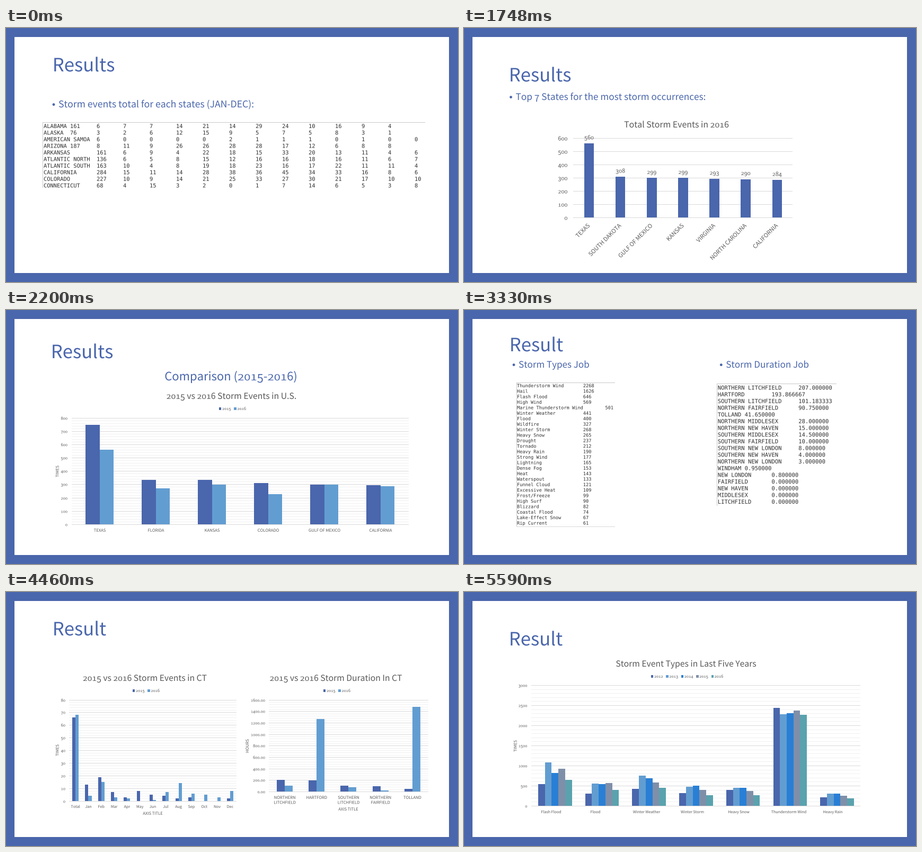
Write a matplotlib script that moves like this. It is 853 px wide and 480 px high and loops after 6.72 s.

```python
import numpy as np
import matplotlib.pyplot as plt
from matplotlib.animation import FuncAnimation
from matplotlib.patches import Circle, PathPatch, Rectangle
from matplotlib.path import Path
from matplotlib.textpath import TextPath
from matplotlib.transforms import Affine2D

W, H, DPI = 853, 480, 64
TICK = 10
LOOP = 6720
FIRST, STAY = 1070, 1130

BLUE, SKY, AZURE, SLATE, TEAL = "#4a66ac", "#629dd1", "#297fd5", "#7f8fa9", "#5aa2ae"
PAIR = BLUE, SKY
GREY, INK, MAJOR, MINOR, EDGE = "#595959", "#303030", "#d9d9d9", "#f0f0f0", "#c8c8c8"
SANS, MONO = "Noto Sans CJK JP", "DejaVu Sans Mono"
MONO_EM = 0.602

# Storm events in 2016, by state and by type
TOTALS = {"ALABAMA": 161, "ALASKA": 76, "AMERICAN SAMOA": 6, "ARIZONA": 187,
          "ARKANSAS": 161, "ATLANTIC NORTH": 136, "ATLANTIC SOUTH": 163,
          "CALIFORNIA": 284, "COLORADO": 227, "CONNECTICUT": 68}
TOP = {"TEXAS": 560, "SOUTH DAKOTA": 308, "GULF OF MEXICO": 299, "KANSAS": 299,
       "VIRGINIA": 293, "NORTH CAROLINA": 290, "CALIFORNIA": 284}
CT_MONTHS = (4, 15, 3, 2, 0, 1, 7, 14, 6, 5, 3, 8)
KNOWN = {"Thunderstorm Wind": 2268, "Hail": 1626, "Flash Flood": 646, "Winter Weather": 441,
         "Flood": 400, "Winter Storm": 268, "Heavy Snow": 265, "Heavy Rain": 190,
         "Waterspout": 133, "Rip Current": 61}
TYPES = """Thunderstorm Wind,Hail,Flash Flood,High Wind,Marine Thunderstorm Wind,
Winter Weather,Flood,Wildfire,Winter Storm,Heavy Snow,Drought,Tornado,Heavy Rain,
Strong Wind,Lightning,Dense Fog,Heat,Waterspout,Funnel Cloud,Excessive Heat,Frost/Freeze,
High Surf,Blizzard,Coastal Flood,Lake-Effect Snow,Rip Current""".replace("\n", "").split(",")
AREAS = """NORTHERN LITCHFIELD,HARTFORD,SOUTHERN LITCHFIELD,NORTHERN FAIRFIELD,TOLLAND,
NORTHERN MIDDLESEX,NORTHERN NEW HAVEN,SOUTHERN MIDDLESEX,SOUTHERN FAIRFIELD,
SOUTHERN NEW LONDON,SOUTHERN NEW HAVEN,NORTHERN NEW LONDON,WINDHAM,NEW LONDON,FAIRFIELD,
NEW HAVEN,MIDDLESEX,LITCHFIELD""".replace("\n", "").split(",")
HOURS = (207, 193.866667, 101.183333, 90.75, 41.65, 28, 15, 14.5, 10, 8, 4, 3, 0.95, 0.8)

fig = plt.figure(figsize=(W / DPI, H / DPI), dpi=DPI, facecolor="white")
ax = None
glyphs = {}


def outline(s, family):
    return TextPath((0, 0), s, size=100, prop={"family": family})


def glyph(c, family):
    """Outline and advance of one character, 100 units per em."""
    key = c, family
    if key not in glyphs:
        bar = outline("|", family).get_extents().x1
        adv = outline(c + "|", family).get_extents().x1 - bar
        path = outline(c, family)
        # old-style figures
        if family == SANS and c in "012":
            path = path.transformed(Affine2D().scale(1, 0.72))
        elif family == SANS and c in "34579":
            path = path.transformed(Affine2D().translate(0, -19))
        glyphs[key] = path, adv
    return glyphs[key]


def text(x, y, s, size, color=GREY, ha=0.0, rot=0, family=SANS, clip=None):
    """Text with its baseline at y; ha is 0 left, 0.5 centre, 1 right."""
    parts, pen = [], 0
    for c in s:
        path, adv = glyph(c, family)
        if len(path.vertices):
            parts.append(path.transformed(Affine2D().translate(pen, 0)))
        pen += adv
    k = size / 100
    place = Affine2D().translate(-ha * pen, 0).scale(k, -k).rotate_deg(-rot).translate(x, y)
    shape = Path.make_compound_path(*parts).transformed(place)
    patch = ax.add_patch(PathPatch(shape, fc=color, lw=0))
    if clip:
        patch.set_clip_path(clip)


def rect(x, y, w, h, color):
    return ax.add_patch(Rectangle((x, y), w, h, fc=color, lw=0))


def corner(x, y, w, h):
    rect(x, y, w, 1, EDGE)
    rect(x, y, 1, h, EDGE)


def title(x, y, s):
    text(x - 2.3, y, s, 34.7, BLUE)


def heading(x, s, size=15.7, y=168):
    text(x, y, s, size, ha=0.5)


def bullet(x, y, s, size=17.2):
    ax.add_patch(Circle((x, y - 5.4), 2.4, fc=BLUE, lw=0))
    text(x + 9, y, s, size, BLUE)


def table(x, y, rows, pitch, char, clip=None):
    for i, row in enumerate(rows):
        text(x, y + i * pitch, row.expandtabs(8), char / MONO_EM, INK, family=MONO, clip=clip)


def chart(x0, x1, y0, y1, top, step, minor, values, colors, width,
          size=7.5, gap=8, fmt="%d"):
    """Grid, axis numbers and grouped bars; returns the group centres."""
    scale = (y0 - y1) / top
    if minor:
        for v in np.arange(0, top, minor):
            rect(x0, round(y0 - v * scale), x1 - x0, 1, MINOR)
    for v in range(0, top + 1, step):
        y = round(y0 - v * scale)
        rect(x0, y, x1 - x0, 1, MAJOR)
        text(x0 - gap, y + 0.5 + 0.37 * size, fmt % v, size, ha=1)
    pitch = (x1 - x0) / len(values)
    centres = [x0 + pitch * (i + 0.5) for i in range(len(values))]
    for cx, group in zip(centres, values):
        left = cx - width * len(group) / 2
        for j, v in enumerate(group):
            if v:
                rect(left + j * width, y0 - v * scale, width, v * scale, colors[j])
    return centres


def legend(x, y, first, colors):
    for i, color in enumerate(colors):
        rect(x + i * 28.4, y - 2, 4.5, 4.5, color)
        text(x + 6 + i * 28.4, y + 3, str(first + i), 7.5)


def labels(xs, y, names, size=7.6):
    for x, name in zip(xs, names):
        for i, line in enumerate(name.split("\n")):
            text(x, y + 9.3 * i, line, size, ha=0.5)


def axis_name(x, y, s, rot=0):
    text(x, y, s, 7.6, ha=0.5, rot=rot)


def state_table():
    title(90, 82, "Results")
    bullet(90, 150, "Storm events total for each states (JAN-DEC):", 17.6)
    corner(69, 178, 722, 124)
    # each total is spread over the months, more of it in summer
    rng = np.random.default_rng(16)
    season = 1 - 0.6 * np.cos(2 * np.pi * (np.arange(12) + 0.5) / 12)
    rows = []
    for state, total in TOTALS.items():
        months = rng.multinomial(total, season / season.sum())
        if state == "CONNECTICUT":
            months = CT_MONTHS
        rows.append("\t".join([state, str(total)] + [str(m) for m in months]))
    table(71, 189, rows, 12.48, 6.25)


def top_states():
    title(87, 101, "Results")
    bullet(88.5, 136, "Top 7 States for the most storm occurrences:")
    heading(401, "Total Storm Events in 2016", 15.9, 188)
    xs = chart(206.4, 620.4, 358, 208, 600, 100, 0, [(v,) for v in TOP.values()], [BLUE], 18.6,
               size=10.8, gap=11)
    for x, (name, v) in zip(xs, TOP.items()):
        text(x, 350.5 - v / 4, str(v), 10.8, ha=0.5)
        text(x + 2.2, 374.2, name, 10.9, ha=1, rot=45)


def year_comparison():
    title(87, 91, "Results")
    text(424.5, 133, "Comparison (2015-2016)", 22, BLUE, ha=0.5)
    heading(425.5, "2015 vs 2016 Storm Events in U.S.", 15.8)
    legend(402, 186, 2015, PAIR)
    now = {"FLORIDA": 268, **TOTALS, **TOP}
    before = {"TEXAS": 747, "FLORIDA": 335, "KANSAS": 332, "COLORADO": 308,
              "GULF OF MEXICO": 296, "CALIFORNIA": 292}
    values = [(v, now[name]) for name, v in before.items()]
    xs = chart(124, 760, 405, 203.5, 800, 100, 20, values, PAIR, 26.5)
    labels(xs, 419, before)
    axis_name(99.5, 305, "TIMES", 90)


def job_tables():
    title(88, 78, "Result")
    bullet(94, 109, "Storm Types Job", 17)
    bullet(485.3, 109, "Storm Duration Job", 17)
    # types without a known count fall evenly between their neighbours
    ranks = [TYPES.index(name) for name in KNOWN]
    counts = np.exp(np.interp(range(len(TYPES)), ranks, np.log(list(KNOWN.values()))))
    rows = [name + "\t" * max(1, 3 - len(name) // 8) + "%.0f" % n
            for name, n in zip(TYPES, counts)]
    window = rect(99, 137, 186, 272.6, "white")
    table(100, 146, rows + ["Extreme Cold/Wind Chill"], 10.385, 5.2, clip=window)
    corner(99, 137, 186, 273)
    rect(99, 409, 186, 1, MAJOR)

    corner(477, 139, 226, 231)
    hours = HOURS + (0,) * (len(AREAS) - len(HOURS))
    table(478.8, 150.5, ["%s\t%.6f" % row for row in zip(AREAS, hours)], 12.68, 6.35)


def state_charts():
    title(90, 82, "Result")
    heading(262, "2015 vs 2016 Storm Events in CT")
    legend(239, 186, 2015, PAIR)
    before = (13, 19, 7, 3, 8, 5, 4, 2, 3, 0, 0, 2)
    values = [(sum(before), sum(CT_MONTHS)), *zip(before, CT_MONTHS)]
    xs = chart(119, 435, 395, 203.5, 80, 10, 2, values, PAIR, 6.1, gap=7)
    labels(xs, 408, "Total Jan Feb Mar Apr May Jun Jul Aug Sep Oct Nov Dec".split(), 7.1)
    axis_name(277, 421, "AXIS TITLE")
    axis_name(99.5, 299, "TIMES", 90)

    heading(622.5, "2015 vs 2016 Storm Duration In CT")
    legend(599, 186, 2015, PAIR)
    values = list(zip(HOURS, (105, 1268, 75, 18, 1475)))
    xs = chart(496, 797, 377, 203.5, 1600, 200, 40, values, PAIR, 15, gap=7, fmt="%.2f")
    labels(xs, 391, [name.replace(" ", "\n") for name in AREAS])
    axis_name(646, 413, "AXIS TITLE")
    axis_name(458, 291, "HOURS", 90)


def five_years():
    title(87, 101, "Result")
    heading(419, "Storm Event Types in Last Five Years", y=141)
    colors = (BLUE, SKY, AZURE, SLATE, TEAL)
    legend(353, 159, 2012, colors)
    before = {"Flash Flood": (545, 1085, 810, 925), "Flood": (300, 550, 540, 565),
              "Winter Weather": (425, 745, 690, 585), "Winter Storm": (315, 480, 500, 400),
              "Heavy Snow": (395, 445, 445, 375),
              "Thunderstorm Wind": (2440, 2270, 2300, 2365),
              "Heavy Rain": (205, 300, 300, 255)}
    values = [years + (KNOWN[name],) for name, years in before.items()]
    chart(127.4, 748.4, 404, 176, 3000, 500, 100, values, colors, 12.7)
    labels((164.5, 248, 344.5, 431, 518.5, 613, 696), 418, before, 7.1)
    axis_name(99.5, 291, "TIMES", 90)


def render(slide):
    """Draw one slide and keep its picture, since it stays still while shown."""
    global ax
    fig.clear()
    ax = fig.add_axes([0, 0, 1, 1])
    ax.set(xlim=(0, W), ylim=(H, 0))
    ax.axis("off")
    rect(0, 0, W, H, BLUE)
    rect(16, 17, 820, 446, "white")
    slide()
    fig.canvas.draw()
    return np.array(fig.canvas.buffer_rgba())


slides = [render(s) for s in (state_table, top_states, year_comparison,
                              job_tables, state_charts, five_years)]
fig.clear()
screen = fig.figimage(slides[0], origin="upper")


def update(i):
    t = i * TICK
    screen.set_data(slides[(t - FIRST) // STAY + 1])
    return [screen]


anim = FuncAnimation(fig, update, frames=LOOP // TICK, interval=TICK,
                     repeat=True, repeat_delay=0)
plt.show()
```
